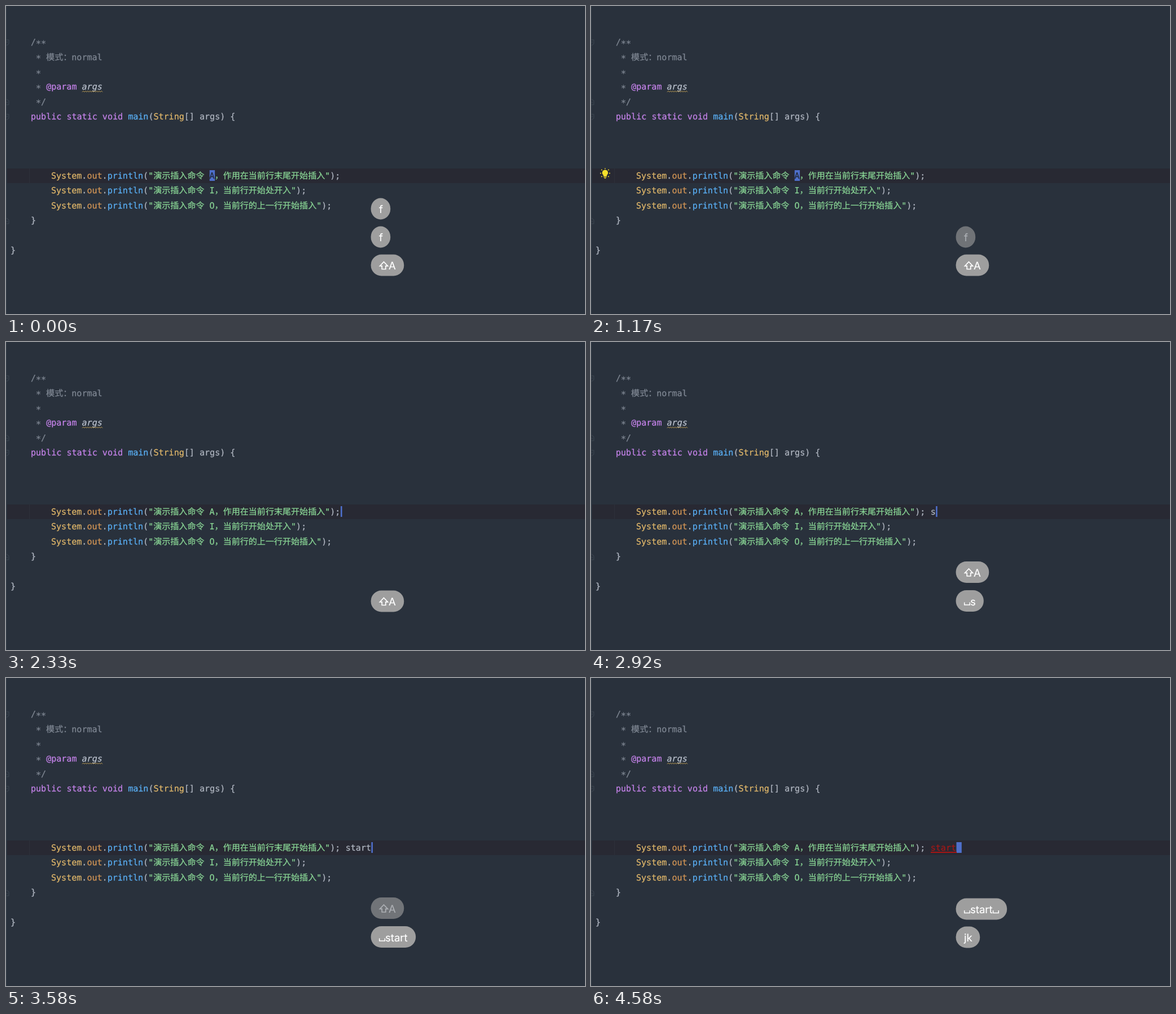
An HTML page for the animation above (4.66 s loop, 1026 px wide and 546 px high).

```html
<!DOCTYPE html>
<html lang="zh-CN">
<head>
<meta charset="utf-8">
<title>Insert command demo</title>
<style>
  html, body { margin: 0; width: 100%; height: 100%; overflow: hidden; background: #29313c; }
  svg { display: block; width: 1026px; height: 546px; }
  text { white-space: pre; text-rendering: geometricPrecision; }
  .code { font: 15.05px "DejaVu Sans Mono", "Noto Sans CJK SC", "Noto Sans CJK", monospace; color: #b0b6c1; }
  .code, .code tspan { fill: currentColor; stroke: currentColor; stroke-width: .25; }
  .ui { font: 12px Inter, "Liberation Sans", sans-serif; fill: #c3c5c7; }
  .pill { font: 18.5px Inter, "Liberation Sans", sans-serif; fill: #fff; stroke: #fff; stroke-width: .2; }
  .c { color: #7f8793; }
  .k { color: #c583ea; }
  .m { color: #5ab0f6; }
  .t { color: #e0b76a; }
  .o { color: #cf9355; }
  .s { color: #89d595; }
  .i { font-style: italic; color: #bcc3cf; }
</style>
</head>
<body>
<svg viewBox="0 0 1026 546" xmlns="http://www.w3.org/2000/svg">
  <rect width="1026" height="546" fill="#29313c"/>
  <rect width="1" height="546" fill="#363f4a"/>
  <rect x="2" y="288" width="1024" height="26" fill="#282933"/>
  <path d="M41.5 288v26" stroke="#2e303b"/>
  <g id="folds" fill="none" stroke="#3d4651"></g>
  <rect id="caret" y="291" height="19" fill="#4e6fcb"/>
  <g id="lines" class="code"></g>
  <path id="wave" fill="none" stroke="#c9a555"/>
  <text id="typed" class="code" y="306"></text>
  <path id="error" d="M602 309h46" stroke="#a81414" stroke-width="2"/>
  <g id="bulb" fill="#f5e02c" stroke="#f5e02c">
    <path d="M25 290.5a5.2 5.2 0 0 1 3 9.4v2.1h-6v-2.1a5.2 5.2 0 0 1 3-9.4z" stroke="none"/>
    <path d="M22.5 303.4h5M23.5 305.3h3" stroke-width="1.3"/>
    <path d="M25 287.5v1.5M16 296.5h2M32 296.5h2M18.3 289.8l1.4 1.4M31.7 289.8l-1.4 1.4M18.3 303l1.4-1.4M31.7 303l-1.4-1.4" stroke-width="1.5"/>
  </g>
  <g id="popup">
    <rect x="567" y="313.5" width="470" height="80" fill="#3a3e41" stroke="#50565b"/>
    <rect x="567.5" y="314" width="459" height="25" fill="#414a60"/>
    <g id="items"></g>
    <text class="ui" x="580" y="383">Press</text>
    <path d="M617 378l4-4.5 4 4.5" fill="none" stroke="#c3c5c7" stroke-width="1.2"/>
    <text class="ui" x="626" y="383">Space to see non-imported classes</text>
    <text class="ui" x="835" y="383" style="fill:#5b95ee">Next Tip</text>
  </g>
  <g id="pills" class="pill"></g>
</svg>
<script>
const $ = id => document.getElementById(id);
const LOOP = 4660, TICK = 1000 / 12, CHAR = 9.06, ROW = 26.3, END = 592.7;

const span = (cls, text) => `<tspan class="${cls}">${text}</tspan>`;
const line = (row, x, body) => `<text x="${x}" y="${(69.3 + row * ROW).toFixed(1)}">${body}</text>`;
// Asterisks sit on the middle of the line
const star = (before, stars, after = '') => span('c', `${before}<tspan dy="2.6">${stars}</tspan><tspan dy="-2.6">${after}</tspan>`);
const print = str => span('t', 'System') + '.' + span('o', 'out') + '.' + span('m', 'println') +
  '(' + span('s', `"${str}"`) + ');';

$('lines').innerHTML = [
  line(0, 44, star('/', '**')),
  line(1, 53, star('', '*', ' 模式：normal')),
  line(2, 53, star('', '*')),
  line(3, 53, star('', '*', ' ') + span('k', '@param ') + span('i', 'args')),
  line(4, 53, star('', '*', '/')),
  line(5, 44, span('k', 'public static void ') + span('m', 'main') + '(' + span('t', 'String') + '[] args) {'),
  line(9, 80, print('演示插入命令 <tspan id="letter">A</tspan>，作用在当前行末尾开始插入')),
  line(10, 80, print('演示插入命令 I，当前行开始处开入')),
  line(11, 80, print('演示插入命令 O，当前行的上一行开始插入')),
  line(12, 44, '}'),
  line(14, 8, '}')
].join('');

// Fold markers: 1 opens downwards, -1 closes upwards
$('folds').innerHTML = [[65, 1], [170, -1], [197, 1], [381, -1]].map(([y, d]) =>
  `<path d="M0 ${y - 5 * d}H5V${y + 2 * d}L1 ${y + 5 * d}M0 ${y - d}H3"/>`).join('');

let zig = 'M135 152.5';
for (let i = 1; i <= 18; i++) zig += `L${135 + i * 2} ${i % 2 ? 150.5 : 152.5}`;
$('wave').setAttribute('d', zig);

const digits = (y, text) =>
  `<text x="580" y="${y}" style="font:bold 7.5px 'DejaVu Sans Mono',monospace" fill="#67b5da">${text}</text>`;
const item = (y, name, grayX) => `
  <path d="M578 ${y - 14}h10l4 4v13h-14z" fill="none" stroke="#56a5cc" stroke-width="1.4"/>
  ${digits(y - 5, '01')}${digits(y + 2, '10')}
  <text class="code" x="600.5" y="${y}" style="color:#c2c6cc">${name}</text>
  <text class="code" x="${grayX}" y="${y}" style="color:#81878e">sun.jvm.hotspot.utilities.soql</text>`;
$('items').innerHTML = item(332, 'JSJavaTypeArray', 747.5) + item(357, 'JSJavaTypeArrayKlass', 792.7);

// Key presses shown by each bubble: [time, key]
const bubbles = [
  [[-1600, 'f']],
  [[-920, 'f']],
  [[-150, '⇧'], [-150, 'A']],
  [[1500, '⇧'], [1500, 'A']],
  [[2750, '␣'], [2915, 's'], [3083, 't'], [3165, 'a'], [3248, 'r'], [3415, 't'], [3665, '␣']],
  [[4330, 'j'], [4498, 'k']]
];
const DELAY = 2000, FADE = 220;
const widths = { f: 6, A: 13, s: 9.6, t: 6.6, a: 10.4, r: 6.7, j: 4.4, k: 9.6, '⇧': 17, '␣': 11 };

function glyph(key, x, y) {
  if (key === '⇧') return `<path d="M${x + 8.5} ${y + 12.5}l7 7.3h-3.7v5.7h-6.6v-5.7h-3.7z" fill="none" stroke-width="1.7"/>`;
  if (key === '␣') return `<path d="M${x + .7} ${y + 21}v4.5h9.6v-4.5" fill="none" stroke-width="1.5"/>`;
  return `<text x="${x}" y="${y + 26}">${key}</text>`;
}

function bubble(keys, y, alpha) {
  let x = 661, body = '', word = '', wordX = x;
  const flush = () => { if (word) body += glyph(word, wordX, y); word = ''; };
  for (const key of keys) {
    if (key === '⇧' || key === '␣') {
      flush();
      body += glyph(key, x, y);
    } else {
      if (!word) wordX = x;
      word += key;
    }
    x += widths[key];
  }
  flush();
  return `<g opacity="${alpha.toFixed(3)}"><rect x="646.6" y="${y - .5}" width="${x - 632.4}" height="38" rx="18.6" ry="18.6" fill="#9e9e9e" stroke="none"/>${body}</g>`;
}

function drawBubbles(t) {
  const live = bubbles.map(b => b.filter(([at]) => at <= t)).filter(b => b.length);
  const lift = t > 2740 && t < 3600 ? 1 : 0;
  $('pills').innerHTML = live.map((b, i) => {
    const slot = live.length - 1 - i;
    const alpha = 1 - Math.max(0, t - b[b.length - 1][0] - DELAY) / FADE;
    return alpha > 0 ? bubble(b.map(k => k[1]), 441 - 50 * slot - lift * (slot + .5), alpha) : '';
  }).join('');
}

const show = (id, on) => $(id).setAttribute('visibility', on ? 'visible' : 'hidden');

function draw(ms) {
  const t = Math.floor((ms % LOOP + 5) / TICK) * TICK;
  const insert = t >= 1500 && t < 4498;
  const text = bubbles[4].filter(([at]) => at <= t).map(k => k[1]).join('').replace(/␣/g, ' ');
  const wrong = t >= 3830;

  $('typed').textContent = text.trim();
  $('typed').setAttribute('x', END + CHAR);
  $('typed').style.color = wrong ? '#a31818' : '';
  show('error', wrong);
  show('bulb', t >= 330 && t < 1500);
  show('popup', t >= 3248 && t < 3415);

  const x = t < 1500 ? 360.8 : insert ? END + .3 + text.length * CHAR : 647.5;
  $('caret').setAttribute('x', x);
  $('caret').setAttribute('width', insert ? 2.6 : 9.3);
  $('letter').style.color = t < 1500 ? '#222a3a' : '';
  drawBubbles(t);
}

function loop() {
  draw(performance.now());
  requestAnimationFrame(loop);
}
loop();
</script>
</body>
</html>
```
